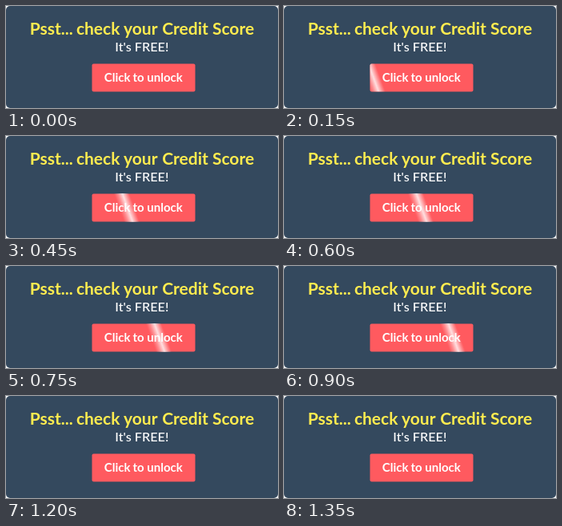
These frames come from a looping animation (340x128 px, 1500 ms). An HTML page:

```html
<!DOCTYPE html>
<html lang="en">
<head>
<meta charset="utf-8">
<title>Credit score banner</title>
<style>
  html, body { margin: 0; width: 340px; height: 128px; overflow: hidden; background: #fff; }
  svg { display: block; }
  text { font-family: Lato, sans-serif; text-anchor: middle; fill: #fff; }
  .title { font-size: 21px; font-weight: 700; fill: #ffec4f; }
  .sub { font-size: 16.2px; font-weight: 500; }
  .label { font-size: 15px; font-weight: 700; }
</style>
</head>
<body>
<svg width="340" height="128" viewBox="0 0 340 128">
  <defs>
    <clipPath id="button"><rect x="107.5" y="72.5" width="129" height="35" rx="2"/></clipPath>
    <linearGradient id="glow">
      <stop offset="0" stop-color="#fff" stop-opacity="0"/>
      <stop offset=".25" stop-color="#fff" stop-opacity=".3"/>
      <stop offset=".55" stop-color="#fff" stop-opacity=".8"/>
      <stop offset=".8" stop-color="#fff" stop-opacity=".35"/>
      <stop offset="1" stop-color="#fff" stop-opacity="0"/>
    </linearGradient>
  </defs>
  <rect width="340" height="128" rx="5" fill="#34495e"/>
  <text class="title" x="170" y="36">Psst... <tspan dx="-1">check your</tspan> <tspan dx="1">Credit Score</tspan></text>
  <text class="sub" x="169.8" y="57">It's FREE!</text>
  <g clip-path="url(#button)">
    <rect x="107" y="72" width="130" height="36" fill="#ff5a5f"/>
    <text class="label" x="171.8" y="95">Click <tspan dx="-.7">to unlock</tspan></text>
    <g id="shine">
      <rect width="19" height="36" fill="url(#glow)" transform="matrix(1 0 .36 1 0 72)"/>
    </g>
  </g>
</svg>
<script>
  const LOOP = 1500, STEPS = 10, START = 75, STRIDE = 20;
  const at = x => ({ transform: `translateX(${x}px)` });

  // The shine jumps one stride per step; the button clips it at both ends.
  document.getElementById('shine').animate(
    [at(START), at(START + STRIDE * STEPS)],
    { duration: LOOP, iterations: Infinity, easing: `steps(${STEPS}, end)` }
  );
</script>
</body>
</html>
```
